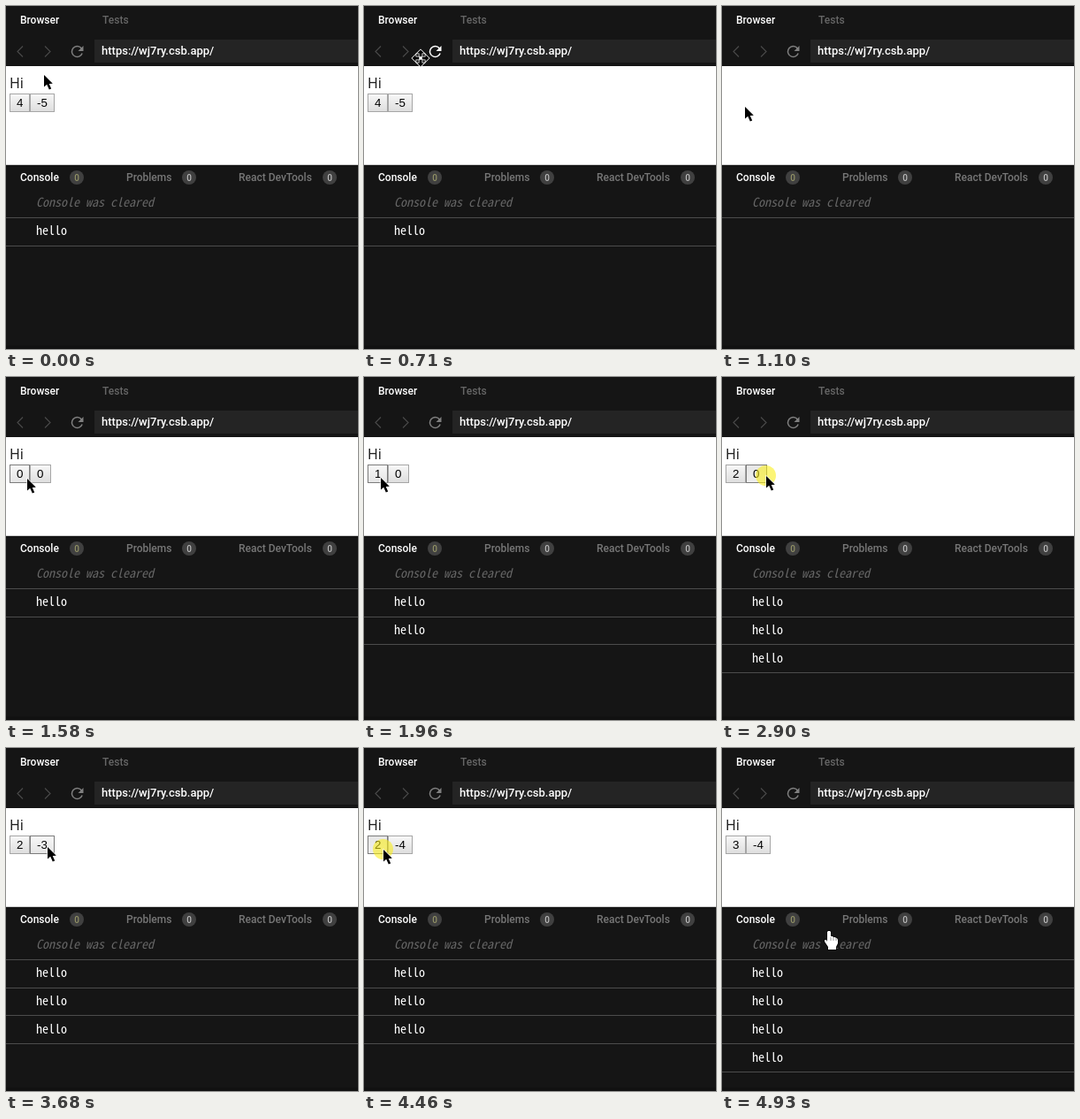
These frames come from a looping animation (398x388 px, 5010 ms). An HTML page with a canvas:

```html
<!DOCTYPE html>
<html lang="en">
<head>
<meta charset="utf-8">
<title>Counter demo</title>
<style>
html, body { margin: 0; width: 100%; height: 100%; overflow: hidden; background: #151515; }
canvas { display: block; }
</style>
</head>
<body>
<canvas id="stage" width="398" height="388"></canvas>
<script>
const ctx = document.getElementById('stage').getContext('2d');
const LOOP = 5010;
const UI = 'Roboto, sans-serif';
const MONO = '14px "Noto Sans Mono CJK JP", "Liberation Mono", monospace';

// time, x, y, pointer shape: each pose holds until the next one
const POSES = [
  [0, 43, 78, 'arrow'], [90, 46, 73, 'arrow'], [170, 54, 61, 'arrow'], [250, 65, 48, 'arrow'],
  [330, 75, 42, 'hand'], [400, 76, 49, 'hand'], [480, 75, 55, 'hand'],
  [710, 64, 59, 'move'], [790, 59, 64, 'arrow'], [860, 50, 78, 'arrow'], [940, 39, 95, 'arrow'],
  [1020, 31, 108, 'arrow'], [1100, 26, 114, 'arrow'], [1180, 24, 115, 'arrow'],
  [1650, 19, 114, 'arrow'], [2430, 28, 114, 'arrow'], [2500, 42, 113, 'arrow'], [2580, 50, 112, 'arrow'],
  [3000, 47, 112, 'arrow'], [4070, 45, 113, 'arrow'], [4150, 41, 114, 'arrow'], [4230, 37, 115, 'arrow'],
  [4310, 32, 116, 'arrow'], [4460, 22, 115, 'arrow'], [4620, 31, 121, 'arrow'], [4700, 55, 141, 'arrow'],
  [4780, 85, 169, 'arrow'], [4850, 109, 194, 'arrow'], [4930, 121, 207, 'hand']
];
const PRESSES = [[630, 710], [1820, 1890], [2280, 2360], [2900, 3000], [3290, 3370], [3590, 3680], [3910, 3990], [4460, 4540]];
const LEFT_CLICKS = [1890, 2360, 4540];
const RIGHT_CLICKS = [3000, 3370, 3680, 3990];
const LOGS = [1260, 1960, 2430, 4620];

const countUntil = (times, t) => times.filter(at => at <= t).length;
const between = (t, from, to) => t >= from && t < to;

function rect(x, y, w, h, color) {
  ctx.fillStyle = color;
  ctx.fillRect(x, y, w, h);
}

function text(str, x, y, font, color, align = 'left') {
  ctx.font = font;
  ctx.fillStyle = color;
  ctx.textAlign = align;
  ctx.fillText(str, x, y);
}

function trace(points, close) {
  ctx.beginPath();
  points.forEach(([x, y]) => ctx.lineTo(x, y));
  if (close) ctx.closePath();
}

function disc(x, y, r, color) {
  ctx.fillStyle = color;
  ctx.beginPath();
  ctx.arc(x, y, r, 0, Math.PI * 2);
  ctx.fill();
}

function stroke(color, width) {
  ctx.strokeStyle = color;
  ctx.lineWidth = width;
  ctx.stroke();
}

function drawToolbar(hot) {
  text('Browser', 16, 20, `500 12px ${UI}`, '#fff');
  text('Tests', 109, 20, `500 12px ${UI}`, '#666');
  rect(100, 38, 298, 26, '#242424');
  text('https://wj7ry.csb.app/', 108, 55, `500 13px ${UI}`, '#fff');
  for (const [x, dir] of [[13, 1], [50, -1]]) {
    trace([[x + 6 * dir, 45.5], [x, 51.5], [x + 6 * dir, 57.5]]);
    stroke('#484848', 1.2);
  }
  const color = hot ? '#fff' : '#808080';
  ctx.beginPath();
  ctx.arc(80.5, 51.5, 6, 0.35, Math.PI * 1.8);
  stroke(color, 1.5);
  trace([[87.5, 45], [87.5, 51], [81.5, 51]], true);
  ctx.fillStyle = color;
  ctx.fill();
}

function drawButton(x, right, label, hover, pressed) {
  const fill = ctx.createLinearGradient(0, 99, 0, 120);
  fill.addColorStop(0, pressed ? '#e6e6e6' : '#f8f8f8');
  fill.addColorStop(1, pressed ? '#eee' : hover ? '#e4e4e4' : '#ddd');
  rect(x, 99, right - x, 21, hover ? '#7c7c7c' : '#a6a6a6');
  rect(x + 1, 100, right - x - 2, 19, fill);
  text(label, x + 8, 114, '13.333px "Liberation Sans", Arial, sans-serif', '#000');
}

function drawPage(t, pose, pressed) {
  rect(0, 68, 398, 111, '#fff');
  rect(0, 179, 398, 1, '#d0d0d0');
  if (between(t, 860, 1180)) return;
  text('Hi', 4, 93, '16px "Noto Sans", sans-serif', '#222');
  const fresh = t < 860;
  const left = fresh ? 4 : countUntil(LEFT_CLICKS, t);
  const right = fresh ? -5 : -countUntil(RIGHT_CLICKS, t) || 0;
  const edge = right < 0 ? 55 : 51;
  const [, x, y] = pose;
  const inRow = between(y, 99, 120);
  const overLeft = inRow && between(x, 4, 27);
  const overRight = inRow && between(x, 27, edge);
  drawButton(4, 27, String(left), overLeft, overLeft && pressed);
  drawButton(27, edge, String(right), overRight, overRight && pressed);
}

function drawConsole(t) {
  [['Console', 16, 80, '#fff', '#929266'], ['Problems', 136, 207, '#777', '#bbb'], ['React DevTools', 263, 366, '#777', '#bbb']]
    .forEach(([label, x, badge, color, digit]) => {
      text(label, x, 198, `500 12px ${UI}`, color);
      disc(badge, 194, 8, '#404040');
      text('0', badge, 197.5, `500 10px ${UI}`, digit, 'center');
    });
  text('Console was cleared', 34, 227, `italic ${MONO}`, '#666');
  rect(0, 239, 398, 1, '#4c4c4c');
  const rows = t < 860 ? 1 : countUntil(LOGS, t);
  for (let i = 0; i < rows; i++) {
    text('hello', 34, 259 + 32 * i, MONO, '#fff');
    rect(0, Math.floor(271 + 31.7 * i), 398, 1, '#4c4c4c');
  }
  rect(0, 384, 398, 4, '#111');
}

const pointers = {
  arrow() {
    trace([[0, 0], [0, 13.5], [3.2, 10.7], [5.8, 16.5], [8.2, 15.4], [5.7, 9.9], [9.8, 9.7]], true);
    stroke('#fff', 1.2);
    ctx.fillStyle = '#000';
    ctx.fill();
  },
  move() {
    for (let i = 0; i < 4; i++) {
      trace([[0, -9.5], [4, -5.5], [1.5, -5.5], [1.5, -1.5], [-1.5, -1.5], [-1.5, -5.5], [-4, -5.5]], true);
      stroke('#fff', 1.5);
      ctx.fillStyle = '#000';
      ctx.fill();
      ctx.rotate(Math.PI / 2);
    }
    rect(-1.5, -1.5, 3, 3, '#fff');
  },
  hand() {
    trace([[-1, 0], [1, 0], [2, 1], [2, 6], [4, 6], [5, 7], [7, 7], [8, 8], [9, 8], [10, 10],
      [10, 14], [8, 18], [8, 21], [-1, 21], [-1, 18], [-5, 12], [-5, 10], [-3, 10], [-2, 12], [-2, 1]], true);
    stroke('#000', 1.5);
    ctx.fillStyle = '#fff';
    ctx.fill();
    for (const x of [2, 5, 8]) {
      trace([[x, 7], [x, 11]]);
      stroke('#555', 0.6);
    }
  }
};

function draw(t) {
  const pose = POSES[countUntil(POSES.map(p => p[0]), t) - 1];
  const pressed = PRESSES.some(([from, to]) => between(t, from, to));
  const [, x, y, shape] = pose;
  rect(0, 0, 398, 388, '#151515');
  drawToolbar(between(t, 330, 790));
  drawPage(t, pose, pressed);
  drawConsole(t);
  if (pressed) disc(x - 0.5, y - 0.5, 11.5, 'rgba(250, 238, 20, 0.58)');
  ctx.save();
  ctx.translate(x, y);
  pointers[shape]();
  ctx.restore();
}

const start = performance.now();
function tick() {
  draw((performance.now() - start) % LOOP);
  requestAnimationFrame(tick);
}
draw(0);
requestAnimationFrame(tick);
</script>
</body>
</html>
```
